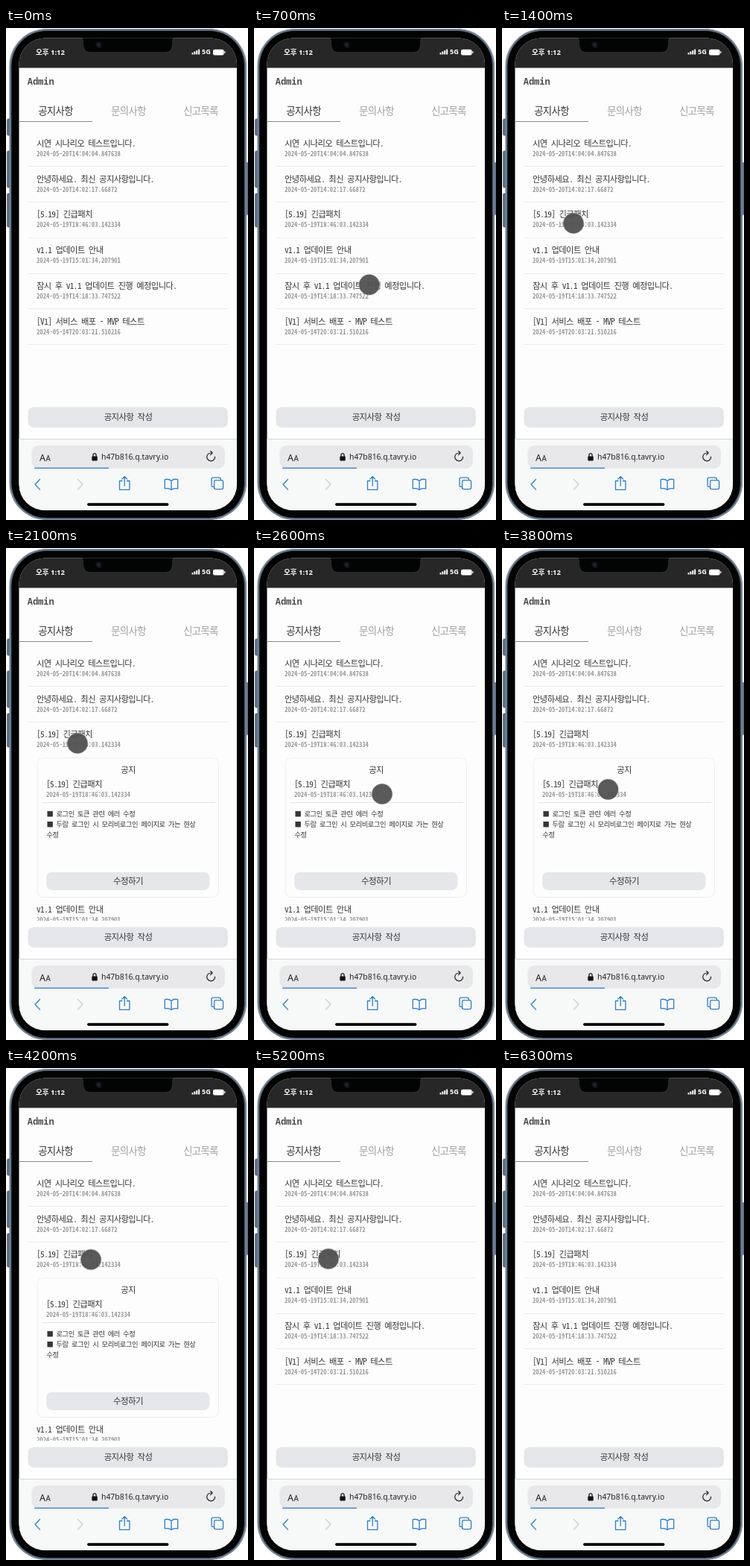
Write an HTML page that moves like this. It is 325 px wide and 660 px high and loops after 6.4 s.

```html
<!DOCTYPE html>
<html lang="ko">
<head>
<meta charset="utf-8">
<style>
html, body { margin: 0; width: 100%; height: 100%; overflow: hidden; background: #fff; }
svg { display: block; width: 325px; height: 660px; }
text { font-family: 'Noto Sans Mono CJK KR', 'Noto Sans CJK KR', 'Noto Sans CJK', monospace; letter-spacing: -.05em; white-space: pre; }
.date { letter-spacing: 0; font-weight: 700; }
.sans { font-family: 'Noto Sans', 'Noto Sans CJK KR', sans-serif; letter-spacing: 0; }
.mono { font-family: 'Noto Sans Mono', monospace; letter-spacing: 0; }
.line { fill: none; stroke-linecap: round; stroke-linejoin: round; }
</style>
</head>
<body>
<svg viewBox="0 0 325 660">
  <defs>
    <clipPath id="screenClip"><rect x="17.5" y="13.5" width="292.5" height="633.5" rx="35"/></clipPath>
    <clipPath id="listClip"><rect x="18" y="130" width="292" height="370"/></clipPath>
    <clipPath id="cardClip"><rect id="cardMask" x="18" y="280" width="292" height="0"/></clipPath>
  </defs>

  <g fill="#5d7085" stroke="#36465a" stroke-width=".6">
    <rect x="1.5" y="122" width="5" height="22" rx="1.5"/>
    <rect x="1.5" y="165" width="5" height="49" rx="1.5"/>
    <rect x="1.5" y="222" width="5" height="45" rx="1.5"/>
    <rect x="320" y="180" width="4.6" height="71" rx="1.5"/>
  </g>
  <rect x="4.5" y="1" width="318.5" height="659" rx="50" fill="#4c5c6f"/>
  <rect x="5.4" y="1.9" width="316.7" height="657.2" rx="49" fill="none" stroke="#9caabb" stroke-width=".9"/>
  <rect x="7.5" y="4" width="312.5" height="653" rx="47" fill="#020303"/>

  <g clip-path="url(#screenClip)">
    <rect x="17" y="13" width="294" height="635" fill="#fdfdfd"/>
    <rect x="17" y="13" width="294" height="40.5" fill="#272727"/>
    <path d="M100 13q4 0 4 4v5q0 10 10 10h99q10 0 10-10v-5q0-4 4-4z" fill="#020303"/>
    <rect x="17" y="551" width="294" height="97" fill="#f7f8f8"/>
    <path d="M17 551.5H311" stroke="#d5d6d7"/>
  </g>
  <circle cx="124.5" cy="22.5" r="4.2" fill="#11151b"/>
  <circle cx="124.5" cy="22.5" r="2" fill="#20293a"/>

  <g fill="#fff">
    <rect x="249.5" y="33" width="2" height="2.5" rx=".6"/>
    <rect x="252.4" y="31.6" width="2" height="3.9" rx=".6"/>
    <rect x="255.3" y="30" width="2" height="5.5" rx=".6"/>
    <rect x="258.2" y="28.4" width="2" height="7.1" rx=".6"/>
    <rect x="278" y="28.8" width="14.6" height="7.6" rx="2.2"/>
    <rect x="293.2" y="31" width="1.2" height="3" rx=".6"/>
  </g>

  <path d="M18 125.5H116" stroke="#8b8b8b" stroke-width="1.2"/>
  <g id="head"></g>

  <g clip-path="url(#listClip)">
    <g id="upper"></g>
    <g clip-path="url(#cardClip)">
      <rect x="42" y="281.5" width="243.5" height="187" rx="8" fill="#fdfdfd" stroke="#ededef"/>
      <path d="M48 341.5H281" stroke="#e8e8e8"/>
      <rect x="54" y="435" width="219.5" height="24" rx="8" fill="#e5e6e9"/>
      <g id="card"></g>
    </g>
    <path id="divider" d="M29 281.5H298" stroke="#ececec"/>
    <g id="lower"></g>
  </g>

  <rect x="29.5" y="508.5" width="268.5" height="27.5" rx="8" fill="#e4e6e9"/>
  <rect x="34.5" y="560" width="259.5" height="31" rx="9" fill="#e8e8ea"/>
  <g id="foot"></g>
  <path d="M38 590.4H138" stroke="#2d7bc8" stroke-width="1.3"/>
  <rect x="115.3" y="574.6" width="7.4" height="5.8" rx="1" fill="#111"/>
  <path d="M116.9 575v-2a2.1 2.1 0 0 1 4.2 0v2" class="line" stroke="#111" stroke-width="1.2"/>
  <g class="line" stroke="#222" stroke-width="1.2">
    <path d="M280.6 575.2a5.4 5.4 0 1 1-5.4-5.2h1.6"/>
    <path d="M274.6 567.4l2.6 2.6-2.6 2.6"/>
  </g>
  <g class="line" stroke="#2c7fce" stroke-width="1.3">
    <path d="M45.5 605.5l-6.5 6.8 6.5 6.8"/>
    <path d="M96.5 605.5l6.5 6.8-6.5 6.8" stroke="#cbcccd"/>
    <path d="M156 607.5h-3.5v11.8h13.4v-11.8h-3.5M159.2 614v-12M155.9 605l3.3-3.3 3.3 3.3"/>
    <path d="M222 619.5v-12q-3.5-3.2-8.7-1.8v12.2q5.2-1.2 8.7 1.6q3.5-2.8 8.7-1.6v-12.2q-5.2-1.4-8.7 1.8"/>
    <rect x="279.6" y="606.6" width="12" height="12" rx="2"/>
    <path d="M279.6 615.4h-1.5q-2 0-2-2v-8.2q0-2 2-2h8.2q2 0 2 2v1.4"/>
  </g>
  <rect x="109" y="637.3" width="109.5" height="3.6" rx="1.8" fill="#050505"/>

  <g id="pointer">
    <circle r="14.5" fill="#b5b5b5" opacity=".5"/>
    <circle r="13.6" fill="#4b4b4d" opacity=".9"/>
  </g>
</svg>
<script>
const $ = id => document.getElementById(id);
const NS = 'http://www.w3.org/2000/svg';
const LOOP = 6400, TICK = 100, CARD_H = 187;

function add(group, tag, attrs, content = '') {
  const el = document.createElementNS(NS, tag);
  for (const k in attrs) el.setAttribute(k, attrs[k]);
  el.textContent = content;
  $(group).append(el);
}

// y is the vertical middle of the glyphs
function label(group, content, x, y, size = 11.3, fill = '#363636', extra = {}) {
  add(group, 'text', { x, y: y + size * .37, 'font-size': size, fill, ...extra }, content);
}

const dateLabel = (group, content, x, y) =>
  label(group, content, x, y, 8.7, '#9a9a9f', { class: 'date' });

const mid = { 'text-anchor': 'middle' };
const sans = { class: 'sans' };

label('head', '오후 1:12', 40, 32, 9.5, '#fff', { ...sans, 'font-weight': 600 });
label('head', '5G', 263, 32, 9.2, '#fff', { ...sans, 'font-weight': 600 });
label('head', 'Admin', 28.7, 71.6, 12, '#505050', { class: 'mono', 'font-weight': 600 });
label('head', '공지사항', 66.5, 111, 13.4, '#363636', mid);
label('head', '문의사항', 164.5, 111, 13.4, '#a0a0a0', mid);
label('head', '신고목록', 261.5, 111, 13.4, '#a0a0a0', mid);

const notices = [
  ['시연 시나리오 테스트입니다.', '2024-05-20T14:04:04.847638'],
  ['안녕하세요. 최신 공지사항입니다.', '2024-05-20T14:02:17.66872'],
  ['[5.19] 긴급패치', '2024-05-19T18:46:03.142334'],
  ['v1.1 업데이트 안내', '2024-05-19T15:01:34.207901'],
  ['잠시 후 v1.1 업데이트 진행 예정입니다.', '2024-05-19T14:18:33.747522'],
  ['[V1] 서비스 배포 - MVP 테스트', '2024-05-14T20:03:21.510216']
];
notices.forEach(([title, date], i) => {
  const group = i < 3 ? 'upper' : 'lower', y = 154.7 + i * 47.8;
  label(group, title, 41, y);
  dateLabel(group, date, 41, y + 13.8);
  if (i !== 2) add(group, 'path', { d: `M29 ${Math.round(y + 30.5) + .5}H298`, stroke: '#ececec' });
});

label('card', '공지', 164, 298, 11.3, '#363636', mid);
label('card', notices[2][0], 54, 317);
dateLabel('card', notices[2][1], 54, 330.5);
['■ 로그인 토큰 관련 에러 수정', '■ 두람 로그인 시 모리비로그인 페이지로 가는 현상', '수정']
  .forEach((s, i) => label('card', s, 54.5, 357 + i * 13.6, 9.3));
label('card', '수정하기', 164, 447, 11.5, '#363636', mid);

label('foot', '공지사항 작성', 164, 522, 11.4, '#363636', mid);
label('foot', 'A', 45, 576, 12.5, '#222', sans);
label('foot', 'A', 53.4, 577, 10, '#222', sans);
label('foot', 'h47b816.q.tavry.io', 128, 575.6, 10.4, '#222', sans);

// time, x, y, opacity
const moves = [
  [300, 190, 392, 0], [500, 182, 382, 1], [1000, 114, 288, 1], [1400, 96, 262, 1],
  [2300, 96, 262, 1], [2600, 172, 330, 1], [3000, 184, 431, 1], [3100, 185, 433, 1],
  [3300, 185, 433, 1], [3900, 134, 302, 1], [4200, 114, 257, 1], [4400, 110, 257, 1],
  [4600, 110, 257, 1], [4700, 109, 256, 1], [5000, 109, 256, 1], [5200, 100, 256, 1],
  [5400, 100, 256, 1], [5700, 103, 259, 1], [6100, 103, 259, 1], [6300, 103, 259, 0]
];
// time, openness of the notice
const folds = [[1900, 0], [2000, .6], [2100, 1], [5000, 1], [5100, .4], [5200, 0]];

function sample(keys, t) {
  const i = keys.findIndex(k => k[0] > t);
  if (i < 0) return keys[keys.length - 1].slice(1);
  if (i === 0) return keys[0].slice(1);
  const a = keys[i - 1], b = keys[i], p = (t - a[0]) / (b[0] - a[0]);
  return a.slice(1).map((v, j) => v + (b[j + 1] - v) * p);
}

function draw(ms) {
  const t = Math.floor((ms % LOOP) / TICK) * TICK;
  const [x, y, alpha] = sample(moves, t);
  const [open] = sample(folds, t);
  const shift = `translate(0 ${CARD_H * open})`;
  $('pointer').setAttribute('transform', `translate(${x} ${y})`);
  $('pointer').setAttribute('opacity', alpha);
  $('cardMask').setAttribute('height', open ? CARD_H * open + 2 : 0);
  $('lower').setAttribute('transform', shift);
  $('divider').setAttribute('transform', shift);
  $('divider').setAttribute('opacity', 1 - open);
}

const start = performance.now();
function frame() {
  draw(performance.now() - start);
  requestAnimationFrame(frame);
}
frame();
</script>
</body>
</html>
```
